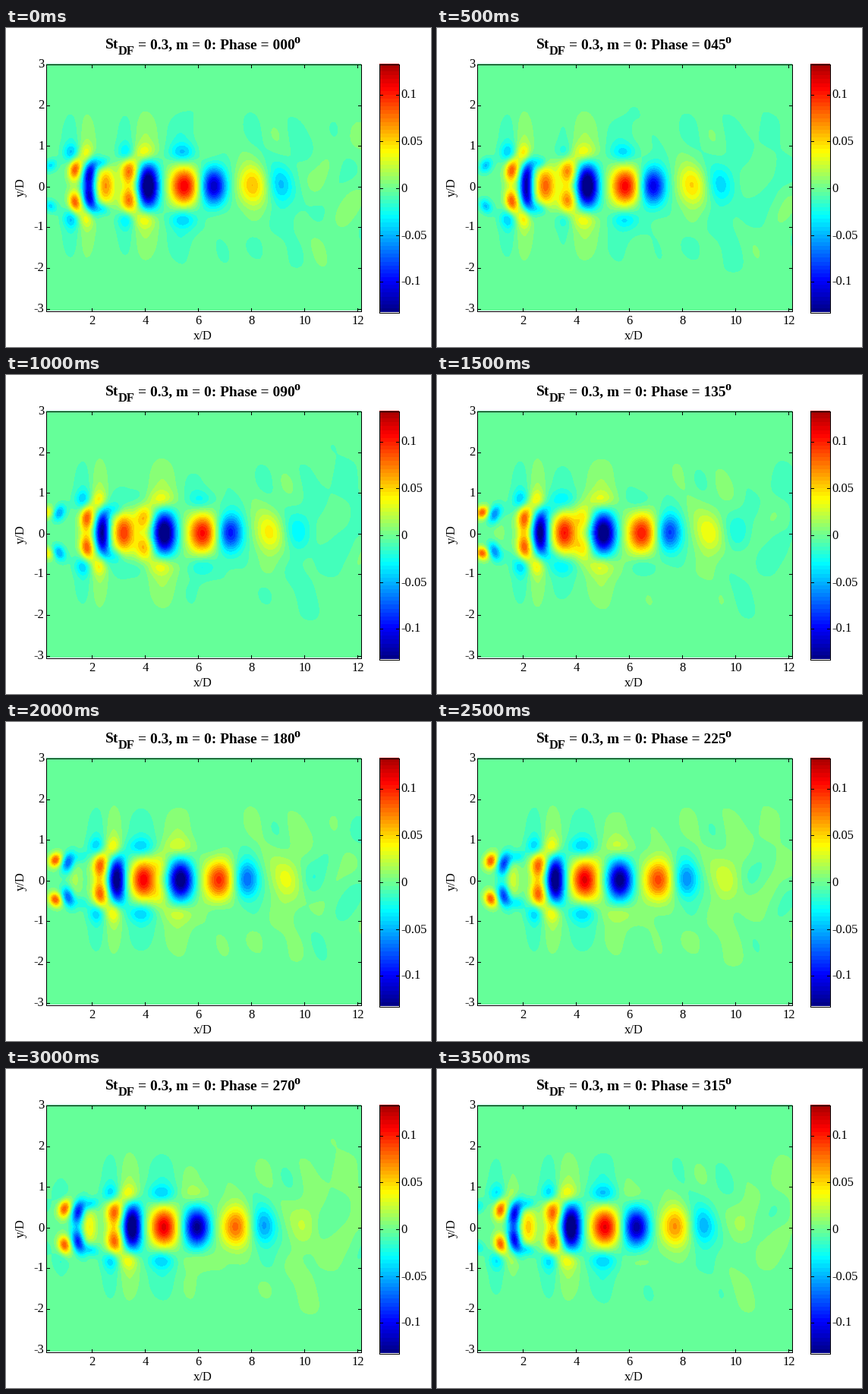
A matplotlib script that plays this animation: 560 px wide and 420 px high, repeating every 4000 ms.

```python
import numpy as np
import matplotlib.pyplot as plt
from matplotlib.animation import FuncAnimation

W, H = 560, 420
LEFT, RIGHT, TOP, BOTTOM = 53, 468, 47, 372
STEPS = 8
RANGE = 0.2658
BAND = 0.0089
SERIF = "Liberation Serif"

cols = np.arange(LEFT, RIGHT) + 0.5
rows = np.arange(TOP, BOTTOM) + 0.5
X, Y = np.meshgrid((cols - 43.2) / 35, (207.8 - rows) / 53.6)

rng = np.random.default_rng(12)
WAVES = list(zip(rng.uniform(1.2, 4.5, 36), rng.uniform(-5, 5, 36),
                 rng.uniform(0, 2 * np.pi, 36)))


def gauss(d, s):
    return np.exp(-0.5 * (d / s) ** 2)


def lerp(t, a, b, t0, t1):
    return a + (b - a) * np.clip((t - t0) / (t1 - t0), 0, 1)


def smooth(t, t0, t1):
    u = lerp(t, 0, 1, t0, t1)
    return u * u * (3 - 2 * u)


def life(t, born, grown, fade, gone):
    return smooth(t, born, grown) * (1 - smooth(t, fade, gone))


def path(t):
    """Slow start in the shear layer, then steady drift downstream."""
    return 0.42 + 1.15 * t + 0.47 * np.log1p(np.exp((t - 0.98) / 0.35))


def vortex(x, amp, sx, off, sy, bend=0):
    """A pair of lobes at +-off, merging into one spot when off is small."""
    if abs(amp) < 1e-4:
        return 0
    peak = max(2 * gauss(off, sy), 1 + gauss(2 * off, sy))
    shape = (gauss(Y - off, sy) + gauss(Y + off, sy)) / peak
    return amp * shape * gauss(X - x - bend * (Y ** 2 - off ** 2), sx)


def halo(x, amp, plume, sx):
    """Spots just outside the shear layer with a tall faint plume."""
    return (vortex(x, amp, sx, 0.81, 0.16)
            + vortex(x, plume, sx * 1.2, 1.15, 0.46))


def flow(t):
    """All structures of one cycle at an age of t cycles."""
    core = path(t)
    hot = core + lerp(t, 0, 1.45, 0.2, 2.1)
    rim = core - 0.4 - 0.15 * t
    bend = lerp(t, 0.35, 0, 1, 2)

    total = vortex(core, -0.15 * life(t, -0.9, 2, 2, 5),
                   lerp(t, 0.17, 0.34, 1.1, 2.4),
                   lerp(t, 0.5, 0.22, 0.2, 1.3) - lerp(t, 0, 0.1, 2, 3),
                   lerp(t, 0.11, 0.29, 0, 1.3), bend)
    total += vortex(hot, 0.115 * life(t, 0.1, 1.7, 1.9, 4.3),
                    lerp(t, 0.19, 0.39, 0.6, 1.9), 0.17, 0.28)
    total += vortex(rim, 0.086 * life(t, 0.1, 0.4, 1.9, 2.9),
                    lerp(t, 0.17, 0.26, 1, 2.2),
                    lerp(t, 0.5, 0.36, 0.4, 1.3),
                    lerp(t, 0.11, 0.24, 0.4, 1.3), bend * 0.6)
    total += vortex(core + 0.48, -0.04 * life(t, 0.2, 0.8, 1, 1.6),
                    0.2, 0.56, 0.11, bend)

    rim_life = life(t, 0.6, 1, 1.9, 2.4)
    total += halo(rim - 0.12, -0.036 * rim_life, -0.012 * rim_life, 0.22)
    core_life = life(t, 0.7, 1.1, 2, 3.3)
    total += halo(core - 0.12, 0.034 * core_life, 0.014 * core_life,
                  lerp(t, 0.21, 0.4, 1.5, 2.8))
    hot_life = life(t, 1.1, 1.5, 1.9, 2.7)
    total += halo(hot - 0.08, -0.034 * hot_life, -0.011 * hot_life, 0.34)
    return total


def ripple(turn):
    """Faint far-field unrest, strongest downstream."""
    angle = 2 * np.pi * turn
    fine = sum(np.cos(kx * X + ky * Y - angle + p) for kx, ky, p in WAVES)
    broad = np.cos(angle + 2.44 - 0.3 * (X - 9))
    reach = np.clip((X - 4) / 4, 0.06, 1) * np.exp(-(Y / 2.2) ** 4)
    return (0.0009 * fine + 0.0045 * broad) * reach


def jet(u):
    u = np.asarray(u)[..., None]
    return np.clip(1.5 - np.abs(4 * u - np.array([3, 2, 1])), 0, 1)


def picture(step):
    turn = step / STEPS
    field = ripple(turn) + sum(flow(turn + n) for n in range(-1, 5))
    level = np.floor(field / BAND + 0.5) * BAND
    return jet(np.clip(0.475 + level / RANGE, 0.01, 0.97))


fig = plt.figure(figsize=(W / 100, H / 100), dpi=100, facecolor="white")
ax = fig.add_axes([0, 0, 1, 1])


def line(xs, ys):
    # The small shift makes snapping land on the named pixel.
    ax.plot(np.array(xs) + 0.1, np.array(ys) + 0.9, color="black", lw=0.72,
            antialiased=False, solid_capstyle="butt", zorder=3)


def box(x0, y0, x1, y1):
    line([x0, x1, x1, x0, x0], [y0, y0, y1, y1, y0])


def label(x, y, s, size=16.5, ha="left", **kw):
    return ax.text(x, y, s, fontsize=size * 0.72, family=SERIF, ha=ha,
                   va=kw.pop("va", "baseline"), **kw)


image = ax.imshow(picture(0), extent=(LEFT, RIGHT, BOTTOM, TOP),
                  interpolation="nearest", aspect="auto")
bar = jet(np.linspace(0.96, 0.01, 64))[:, None, :]
ax.imshow(bar, extent=(492, 518, 374, 47), interpolation="nearest",
          aspect="auto")
ax.set(xlim=(0, W), ylim=(H, 0))
ax.axis("off")

box(LEFT, TOP, RIGHT, BOTTOM)
box(492, 47, 518, 374)
for v in range(2, 13, 2):
    px = 43 + 35 * v
    line([px, px], [BOTTOM, BOTTOM - 4])
    line([px, px], [TOP, TOP + 4])
    label(px + 0.5, 390, str(v), ha="center")
for v in range(-3, 4):
    py = round(207.8 - 53.6 * v)
    line([LEFT, LEFT + 4], [py, py])
    line([RIGHT, RIGHT - 4], [py, py])
    label(50.5, py + 5.5, str(v), ha="right")
for v in (0.1, 0.05, 0, -0.05, -0.1):
    py = round(210 - 1230 * v)
    line([492, 496], [py, py])
    line([518, 514], [py, py])
    label(520.5, py + 5.5, str(v))
label(259, 410, "x/D", ha="center")
label(20, 210, "y/D", ha="center", va="center", rotation=90)

label(131, 27, "St", 19.4, weight="bold")
label(148, 35, "DF", 16.5, weight="bold")
title = label(174, 27, "", 19.4, weight="bold")
label(379, 20.5, "o", 16, weight="bold")


def update(step):
    image.set_data(picture(step))
    title.set_text(f"= 0.3, m = 0: Phase = {step * 45:03d}")
    return image, title


anim = FuncAnimation(fig, update, frames=STEPS, interval=500, repeat=True,
                     repeat_delay=0)
plt.show()
```
